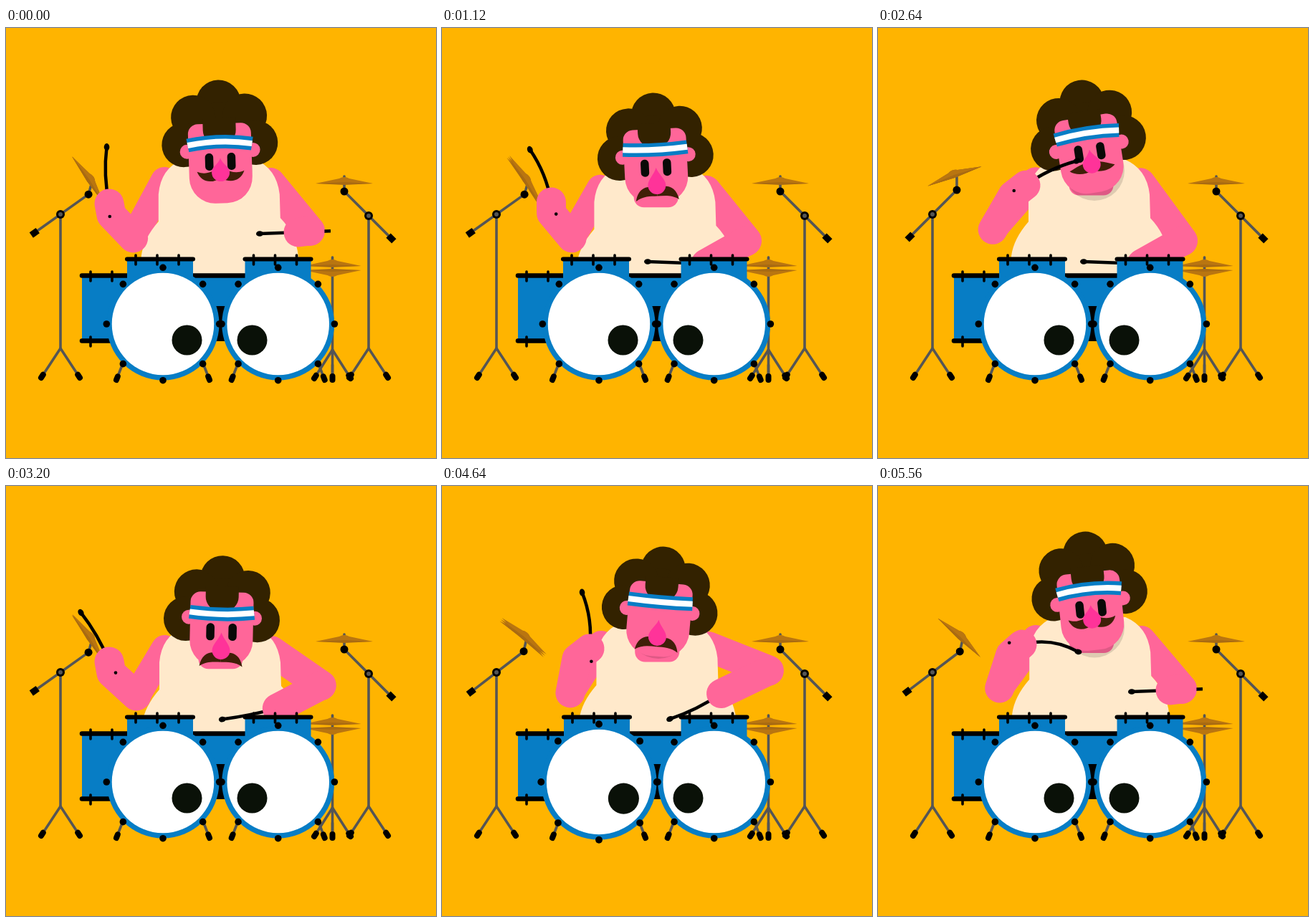
Animation of 600x600 px, one loop 5600 ms. Source, as an HTML page with a canvas:

```html
<!DOCTYPE html>
<html>
<head>
<meta charset="utf-8">
<title>Drummer</title>
<style>
html, body { margin: 0; height: 100%; overflow: hidden; background: #ffb400; }
canvas { display: block; width: 100vw; height: 100vh; }
</style>
</head>
<body>
<canvas id="c" width="600" height="600"></canvas>
<script>
const g = document.getElementById('c').getContext('2d');
const LOOP = 5600, BAR = 1400, BEAT = 700, HALF = 350;
const SKIN = '#ff6699', CREAM = '#ffe9cb', HAIR = '#332200', BLUE = '#077dc5', GREY = '#555', BRASS = '#b97510';
const rad = Math.PI / 180;

// Smooth hump around a moment that repeats every period
function bump(t, mid, reach, period) {
  const d = ((t - mid) % period + period * 1.5) % period - period / 2;
  return Math.abs(d) < reach ? Math.cos(d / reach * Math.PI / 2) ** 2 : 0;
}
// The same hump with a flat top
const hold = (t, mid, reach, period, gain = 1.6) => Math.min(1, gain * bump(t, mid, reach, period));
const wave = (t, mid, period) => Math.cos((t - mid) / period * 2 * Math.PI);
const mix = (a, b, u) => a + (b - a) * u;
const clamp = u => Math.max(0, Math.min(1, u));

function line(color, width, pts, cap = 'round') {
  g.strokeStyle = color; g.lineWidth = width; g.lineCap = cap; g.lineJoin = 'round';
  g.beginPath();
  for (let i = 0; i < pts.length; i += 2) g.lineTo(pts[i], pts[i + 1]);
  g.stroke();
}
function dot(color, x, y, r) {
  g.fillStyle = color; g.beginPath(); g.arc(x, y, r, 0, 7); g.fill();
}
function box(color, x, y, w, h, r = 0) {
  g.fillStyle = color; g.beginPath(); g.roundRect(x, y, w, h, r); g.fill();
}
function shape(color, d) {
  g.fillStyle = color; g.fill(new Path2D(d));
}
function at(x, y, deg, draw) {
  g.save(); g.translate(x, y); g.rotate(deg * rad); draw(); g.restore();
}

function leg(x, y, x2, y2) {
  const d = Math.hypot(x2 - x, y2 - y), ux = (x2 - x) / d, uy = (y2 - y) / d;
  line(GREY, 3.6, [x, y, x2, y2]);
  line('#000', 8, [x2 - ux * 5, y2 - uy * 5, x2, y2]);
}
function cymbal() {
  shape(BRASS, 'M-40 3L-7-4Q0-8 7-4L40 3L0 4Z');
  shape('#a86a12', 'M-40 3L0 1L40 3L0 5Z');
}
function boom(x, y, deg) {
  at(x, y, deg, () => {
    line(GREY, 3.6, [-44, 0, 48, 0]);
    line('#000', 9, [-50, 0, -39, 0], 'butt');
  });
  dot('#000', x, y, 6);
  dot(GREY, x, y, 3);
}
function stand(x, y) {
  line(GREY, 3.6, [x, y, x, 447]);
  for (const s of [-1, 1]) leg(x, 447, x + 27 * s, 488);
}

const cymbalHit = t => hold(t, 25, 130, HALF);

function stands(t) {
  stand(76, 260);
  const hit = cymbalHit(t), b = -45 + 9.5 * hit, lean = 16 * hit;
  const ex = 76 + 48 * Math.cos(b * rad), ey = 260 + 48 * Math.sin(b * rad);
  boom(76, 260, b);
  at(ex, ey, lean, () => line(GREY, 3.6, [0, 0, 0, -18]));
  dot('#000', ex, ey, 5.5);
  const px = ex + 22 * Math.sin(lean * rad) - 4, py = ey - 22 * Math.cos(lean * rad);
  const shimmer = 4 * hold(t, 110, 80, HALF);
  for (const s of [-1, 1, 0]) at(px, py, -20 + 76 * hit + s * shimmer, cymbal);

  line(GREY, 3.6, [455.5, 320, 455.5, 490]);
  for (const x of [430, 481]) leg(455.5, 449, x, 489);
  leg(455.5, 470, 455.5, 491);
  at(455.5, 329, 0, cymbal);
  at(455.5, 341, 180, cymbal);

  stand(506, 262);
  boom(506, 262, 225);
  line(GREY, 3.6, [472, 228, 472, 207]);
  dot('#000', 472, 228, 5.5);
  at(472, 214, 14 * Math.sin((t - 1600) / 32) * bump(t, 1700, 160, LOOP), cymbal);
}

function stick(hx, hy, dx, dy, bend, tail) {
  const d = Math.hypot(dx, dy), ux = dx / d, uy = dy / d;
  g.strokeStyle = '#000'; g.lineWidth = 4.5; g.lineCap = 'butt';
  g.beginPath();
  g.moveTo(hx - ux * tail, hy - uy * tail);
  g.lineTo(hx, hy);
  g.quadraticCurveTo(hx + dx / 2 - uy * bend, hy + dy / 2 + ux * bend, hx + dx, hy + dy);
  g.stroke();
  at(hx + dx, hy + dy, Math.atan2(dy, dx) / rad, () => {
    g.fillStyle = '#000'; g.beginPath(); g.ellipse(0, 0, 5, 3.8, 0, 0, 7); g.fill();
  });
}

// Left arm swings between cymbal and chest on every half beat
function leftArm(t, dy) {
  const inward = hold(t, 200, 140, HALF, 9), drop = dy * inward;
  const hx = mix(144, 206, inward), hy = mix(245, 219, inward) + drop;
  const turn = (t - 60 + LOOP) % HALF;
  const a = (-30 + 130 * (clamp(turn / 180) - clamp((turn - 250) / 52))) * rad;
  const ux = Math.sin(a), uy = -Math.cos(a);
  return {
    elbow: [170 + 12 * wave(t, 50, HALF), mix(293, 281, inward) + drop],
    wrist: [hx + mix(3, -18, inward), hy + mix(16, 14, inward)],
    hand: [hx, hy],
    stick: [ux * 79, uy * 79],
    bend: -5 + 15 * wave(t, 95, HALF),
    butt: [hx - ux * 18, hy - uy * 18]
  };
}

// Right arm: resting pose plus weighted moves of elbow, hand and stick
function rightArm(t) {
  const pose = [425, 297, 368, 329, -81, -3];
  const add = (w, move) => move.forEach((v, i) => pose[i] += v * w);
  add(hold(t, 0, 140, BAR), [-1, -14, 40, -44, 27, 5]);
  add(hold(t, 530, 200, BAR), [33, -42, 23, -42, 10, 41]);
  add(bump(t, 600, 160, BAR), [2, -10, 59, -125, 88, -107]);
  add(bump(t, 1610, 190, LOOP), [35, -60, 120, -160, 155, -59]);
  return pose;
}

function torso(shift, dy, shadow) {
  at(shift, dy, 0, () => {
    shape(CREAM, 'M211 270V232Q214 196 245 183H345Q376 196 380 232L381 265Q403 288 406 318V390H187V318Q190 294 211 270Z');
  });
  box(SKIN, 267 + shift / 2, 180, 62, 53 + dy * 1.6, 14);
  dot('rgba(0,0,0,.13)', 302, shadow, 42);
}

function moustache(y, frown) {
  const smile = [0, -4, 10, -10, 16, 2, 33, -5, 28, 10, 12, 13, 0, 4];
  const sad = [0, -4, 6, -12, 26, -13, 30, 10, 20, 3, 10, 4, 0, 4];
  const v = smile.map((s, i) => mix(s, sad[i], frown));
  for (const side of [-1, 1]) {
    g.save();
    g.translate(0, y); g.scale(side, 1);
    g.fillStyle = '#401f08';
    g.beginPath();
    g.moveTo(v[0], v[1]);
    g.bezierCurveTo(...v.slice(2, 8));
    g.bezierCurveTo(...v.slice(8));
    g.fill();
    g.restore();
  }
}

function head(down, nod, hair, blink) {
  dot(HAIR, 0, hair, 31);
  dot(HAIR, 0, hair + 48, 48);
  for (const s of [-1, 1]) {
    dot(HAIR, 36 * s, hair + 20, 31);
    dot(HAIR, 50 * s, hair + 58, 31);
    dot(SKIN, 46 * s, 18 - 38 * down, 10);
  }
  const top = -24 - 18 * down, chin = 84 - 12 * nod;
  box(SKIN, -44, top, 88, chin - top, [14, 14, 36, 36]);
  box(HAIR, -23, top - 8, 46, 10 - 6 * nod - top, [0, 0, 20, 20]);

  const curve = 8 * nod - 4;
  for (const [color, w] of [[BLUE, 19], ['#fff', 8]]) {
    g.strokeStyle = color; g.lineWidth = w; g.lineCap = 'butt';
    g.beginPath(); g.moveTo(-45, -curve / 2); g.quadraticCurveTo(0, curve * 1.5, 45, -curve / 2); g.stroke();
  }
  if (!blink) for (const x of [-15.5, 15.5]) box('#0a0a08', x - 5.75, 14, 11.5, 24, 5.5);

  moustache(44 + 24 * nod, Math.min(1, 3 * nod));
  const n = 41 + 13 * nod, tip = n - 20 - 6 * nod;
  shape('#ff3399', `M0 ${tip}C3 ${tip + 9} 12.5 ${n - 8} 12.5 ${n}A12.5 12.5 0 0 1-12.5 ${n}C-12.5 ${n - 8}-3 ${tip + 9} 0 ${tip}Z`);
}

function tom(x) {
  box(BLUE, x, 322, 92, 45);
  line('#000', 6, [x, 322.5, x + 92, 322.5]);
  for (let m = 12; m < 80; m += 30) line('#000', 3.6, [x + m, 317, x + m, 330]);
}
function bass(x, size, pupil) {
  for (const s of [-1, 1]) leg(x + 56 * s, 468, x + 65 * s, 491);
  g.save();
  g.translate(x, 413); g.scale(size, size);
  dot(BLUE, 0, 0, 78.5);
  dot('#fff', 0, 0, 71.3);
  for (let i = 0; i < 8; i++) dot('#000', 78.7 * Math.cos(i * 45 * rad), 78.7 * Math.sin(i * 45 * rad), 4.8);
  dot('#0a1108', pupil, 22.5, 21);
  g.restore();
}
function drums(t, low) {
  const kick = bump(t, 530, 105, BAR) > 0;
  box(BLUE, 106, 345, 280, 92);
  line('#000', 6.5, [106, 345.5, 380, 345.5]);
  line('#000', 6.5, [106, 436.5, 200, 436.5]);
  for (const [x, y] of [[118, 346], [148, 346], [118, 437]]) line('#000', 3.6, [x, y - 6, x, y + 7]);
  box('#000', 288, 388, 24, 49);
  if (low) box(CREAM, 288, 394.5, 24, 8);
  tom(kick ? 170 : 169);
  tom(333.5);
  bass(219, kick ? 1.026 : 1, 33.5);
  bass(379.7, 1, -36.2);
}

function draw(t) {
  const down = bump(t, 215, 300, BEAT);
  const nod = 1.1 * bump(t, 300, 310, BEAT);
  const sway = hold(t, 555, 190, BAR) - hold(t, 555 + BEAT, 190, BAR);
  const x = 300 + 8.5 * sway, y = 148 + 94 * down - 8 * bump(t, 665, 90, BEAT);
  const hair = -45 - 32 * bump(t, 175, 300, BEAT);
  const shift = 2.5 + 3.5 * sway, dy = 20 * nod * nod;
  const left = leftArm(t, dy);
  const [ex, ey, hx, hy, sx, sy] = rightArm(t);

  g.fillStyle = '#ffb400';
  g.fillRect(0, 0, 600, 600);
  stands(t);
  line(SKIN, 38, [220 + shift / 2, 213 + dy, ...left.elbow]);
  line(SKIN, 42, [367 + shift, 216 + dy, ex, ey]);
  torso(shift, dy, Math.min(199, y + 52));
  at(x, y, 9 * sway, () => head(down, nod, hair, bump(t, 4640, 80, LOOP) > 0));

  stick(hx, hy, sx, sy, -6 * hold(t, 530, 200, BAR), 45);
  line(SKIN, 41, [ex, ey, hx, hy]);

  stick(...left.hand, ...left.stick, left.bend, 0);
  line(SKIN, 41, [...left.elbow, ...left.wrist, ...left.hand]);
  dot('#000', ...left.butt, 2.3);

  drums(t, down > .8);
}

const start = performance.now();
function frame() {
  draw((performance.now() - start) % LOOP);
  requestAnimationFrame(frame);
}
frame();
</script>
</body>
</html>
```
